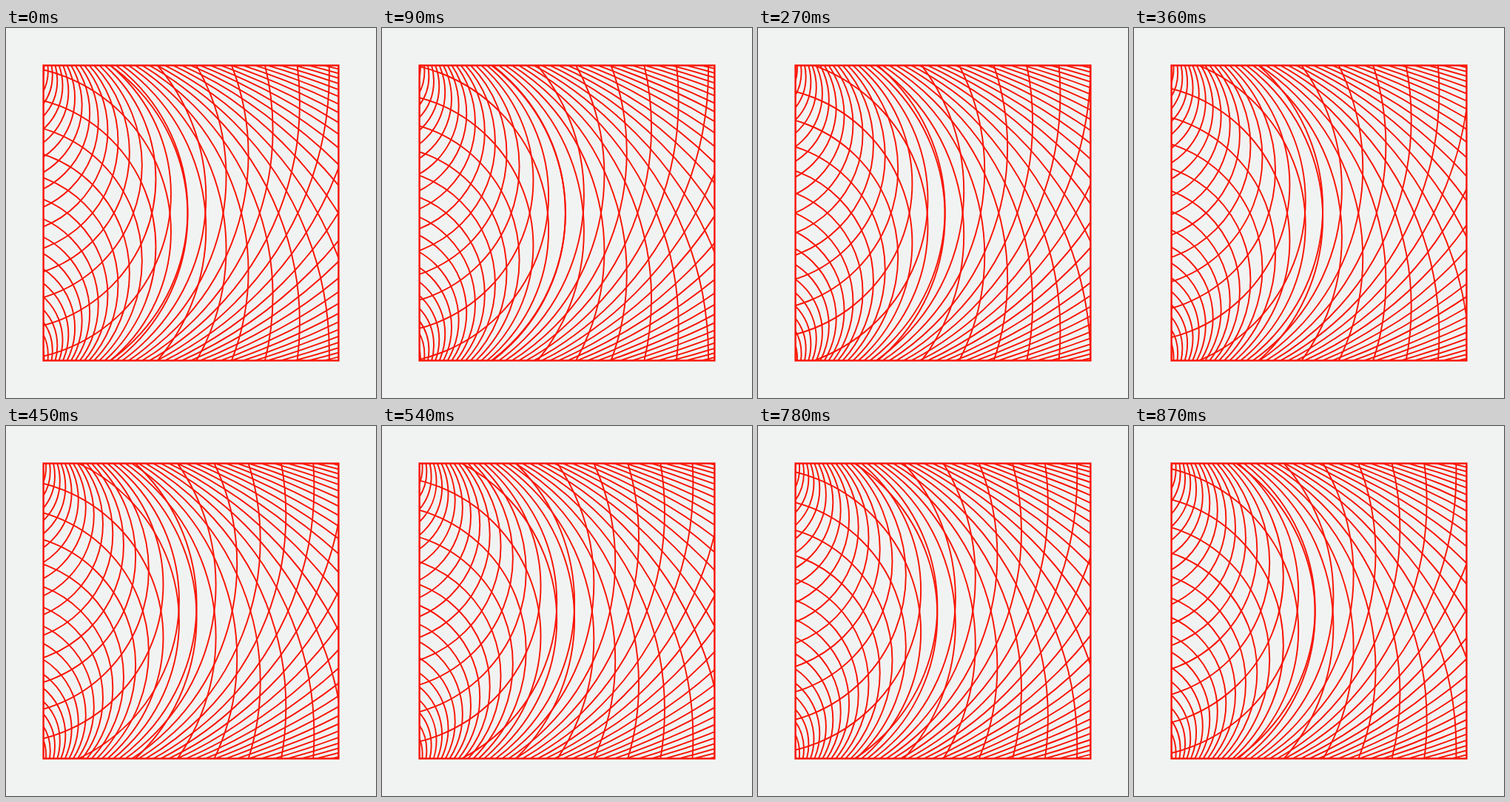
Recreate the animation shown at these times as an HTML page. Size 500 by 500 pixels, loop 0.9 s.

```html
<!DOCTYPE html>
<html lang="en">
<head>
<meta charset="utf-8">
<title>Growing circles</title>
<style>
  html, body { margin: 0; width: 100%; height: 100%; overflow: hidden; background: #f1f3f3; }
  svg { display: block; width: 100vw; height: 100vh; }
</style>
</head>
<body>
<svg viewBox="0 0 500 500" fill="none" stroke="#fa1200">
  <clipPath id="frame"><rect x="50" y="50" width="400" height="400"/></clipPath>
  <g id="rings" clip-path="url(#frame)" stroke-width="1.9"></g>
  <rect x="50.6" y="50.6" width="398.8" height="398.8" stroke-width="2.4"/>
</svg>
<script>
  const LOOP = 900, STEP = 30;
  const GROWTH = 1.1;              // radius ratio between neighbouring rings
  const BASE = 248;                // radius of ring 0 at the loop start
  const APEX = { x: -2.5, y: -1 }; // point shared by all rings of the upper set
  const FIRST = -18, LAST = 23;

  const group = document.getElementById("rings");

  function addRing() {
    const ring = document.createElementNS("http://www.w3.org/2000/svg", "circle");
    ring.setAttribute("cx", APEX.x);
    return group.appendChild(ring);
  }

  function place(ring, cy, r) {
    ring.setAttribute("cy", cy.toFixed(3));
    ring.setAttribute("r", r.toFixed(3));
  }

  const pairs = [];
  for (let k = FIRST; k <= LAST; k++) {
    pairs.push({ k, upper: addRing(), lower: addRing() });
  }

  function draw(time) {
    const phase = Math.floor((time % LOOP) / STEP) * STEP / LOOP;
    for (const { k, upper, lower } of pairs) {
      const r = BASE * GROWTH ** (k + phase);
      const cy = APEX.y + r;
      place(upper, cy, r);
      place(lower, 500 - cy, r);
    }
  }

  let start;
  function tick(now) {
    start ??= now;
    draw(now - start);
    requestAnimationFrame(tick);
  }

  draw(0);
  requestAnimationFrame(tick);
</script>
</body>
</html>
```
